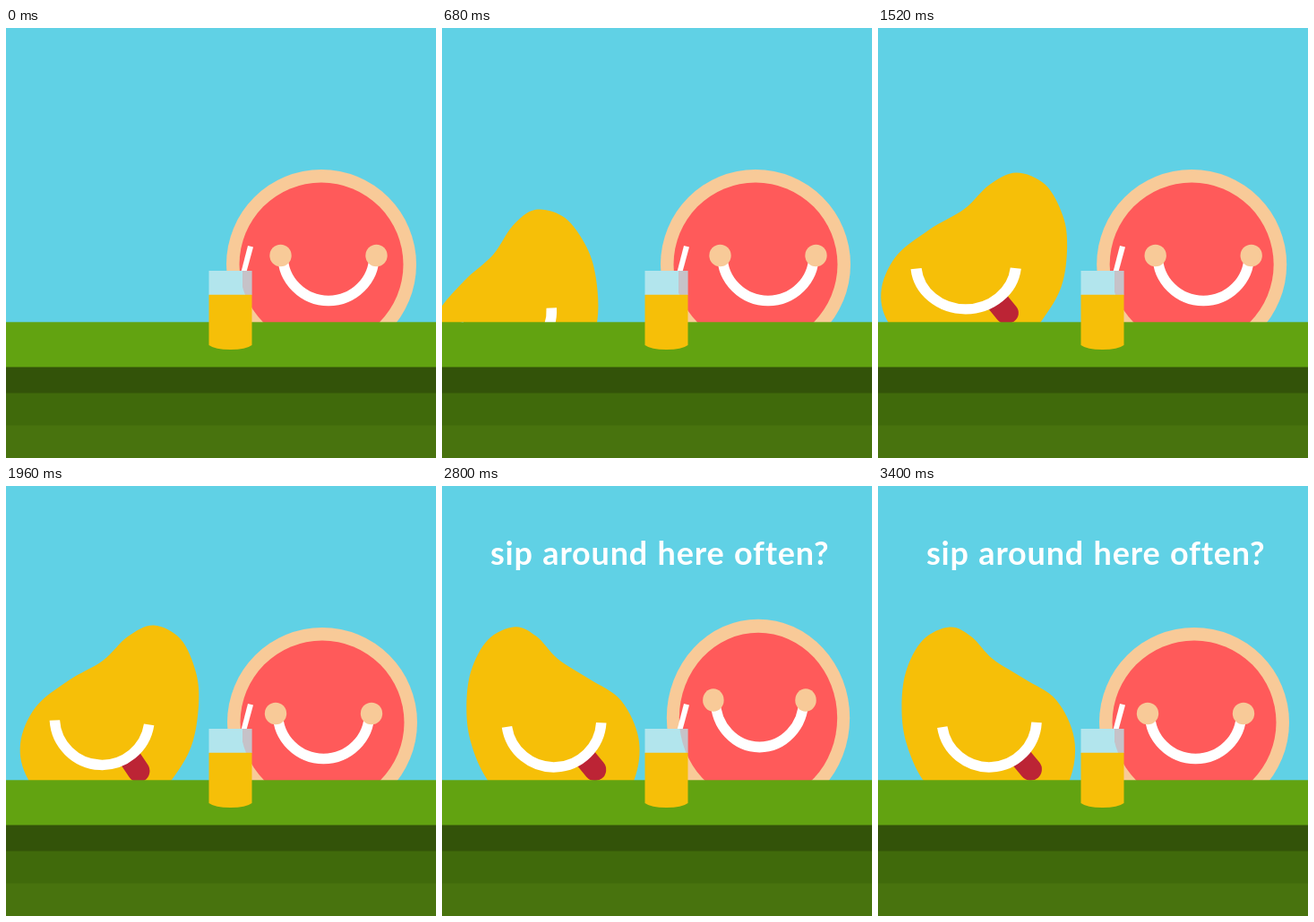
An HTML page that plays this animation: 480 by 480 pixels, repeating every 4160 ms.

```html
<!DOCTYPE html>
<html lang="en">
<head>
<meta charset="utf-8">
<title>Juice bar</title>
<style>
  html, body { margin: 0; width: 100%; height: 100%; overflow: hidden; background: #60d1e5; }
  svg { display: block; width: 100vw; height: 100vh; }
  text { font: 700 36px Lato, "Open Sans", sans-serif; letter-spacing: .8px; word-spacing: 1px; }
</style>
</head>
<body>
<svg viewBox="0 0 480 480">
  <defs>
    <clipPath id="glassSide"><rect x="264" y="271" width="10.5" height="27"/></clipPath>
  </defs>
  <rect width="480" height="480" fill="#60d1e5"/>

  <g id="mango">
    <path id="skin" fill="#f6bf08"/>
    <g id="grin">
      <path transform="translate(0 -6) rotate(53.2)" fill="#bc2435"
            d="M52-12.5H72.5a12.5 12.5 0 0 1 0 25H52z"/>
      <path d="M-52.7 0A53 53 0 0 0 52.7 0" fill="none" stroke="#fff" stroke-width="11.5"/>
    </g>
  </g>

  <g id="grapefruit">
    <circle r="106" fill="#f8ca98"/>
    <circle r="91.5" fill="#ff5a5a"/>
    <g id="face">
      <path d="M-51 0A51 50.5 0 0 0 51 0" fill="none" stroke="#fff" stroke-width="11.5"/>
      <circle cx="-53.5" r="12.2" fill="#f8ca98"/>
      <circle cx="53.5" r="12.2" fill="#f8ca98"/>
    </g>
  </g>

  <rect y="328.3" width="480" height="51" fill="#62a311"/>
  <rect y="378.5" width="480" height="30" fill="#335309"/>
  <rect y="407.5" width="480" height="37" fill="#406a0b"/>
  <rect y="443.5" width="480" height="37" fill="#48730e"/>

  <path d="M270 243L276 244.5L268.5 272H262.5z" fill="#fff"/>
  <rect x="226.5" y="271" width="48" height="27" fill="#b2e5ed"/>
  <g clip-path="url(#glassSide)">
    <circle id="tint" r="91.5" fill="#ff5a5a" opacity=".25"/>
  </g>
  <path d="M226.5 297.7H274.5V354Q268 359 250.5 359T226.5 354z" fill="#f6bf08"/>

  <g id="line"><text x="243.2" y="88" text-anchor="middle" fill="#fff">sip around here often?</text></g>
</svg>

<script>
const LOOP = 4160, STEP = 40, BASE = 360;
const el = id => document.getElementById(id);
const [mango, skin, grin, grapefruit, face, tint, line] =
  ["mango", "skin", "grin", "grapefruit", "face", "tint", "line"].map(el);

const mix = (a, b, k) => a + (b - a) * k;
const ease = {
  linear: p => p,
  in: p => p * p,
  out: p => 1 - (1 - p) ** 2,
  strong: p => 1 - (1 - p) ** 4,
  both: p => p < .5 ? 2 * p * p : 1 - 2 * (1 - p) ** 2
};

// Each key: time, easing into it, values
function pose(keys, t) {
  let i = keys.findIndex(k => k[0] > t);
  if (i < 0) return keys[keys.length - 1].slice(2);
  if (i === 0) return keys[0].slice(2);
  const a = keys[i - 1], b = keys[i];
  const k = ease[b[1]]((t - a[0]) / (b[0] - a[0]));
  return b.slice(2).map((v, n) => mix(a[n + 2], v, k));
}

// dx, dy, tilt, scale x, scale y
const mangoKeys = [
  [400, "both", -188, 134, -27, 1, 1],
  [1040, "strong", 2, 44, -10.3, 1, 1],
  [1120, "both", 2, 44, -10.3, 1, 1],
  [1240, "both", 2, 60, -12, 1.04, .95],
  [1360, "out", 2, -34, -8, .96, 1.08],
  [1480, "in", -2, 4, -4, 1.03, .99],
  [1520, "out", -4, 0, -2.7, 1.055, .96],
  [1600, "both", -3, 0, -1, 1.05, .96],
  [1840, "both", 0, 0, 0, 1, 1],
  [1980, "both", 0, 0, 0, 1, 1],
  [2080, "both", 0, 6, 0, 1.05, .94],
  [2220, "out", 2, -80, -2, .96, 1.1],
  [2360, "in", 1, 0, -5, 1, 1],
  [2440, "out", 1, 0, -6, 1, .98],
  [2500, "out", 1, 0, -8, 1, .98],
  [2760, "both", 0, 0, .5, 1, 1],
  [2920, "both", 0, 0, 0, 1, 1]
];
const turnKeys = [[2080, "linear", 0], [2360, "linear", 1]];

// centre x, centre y, face x, face y, scale x, scale y
const grapeKeys = [
  [0, "both", 352, 264, 8, -10, 1, 1],
  [560, "out", 350, 264, 14, -10, 1, 1],
  [1480, "both", 350, 264, 13.7, -10, 1, 1],
  [1720, "both", 353, 264, 1.5, -10, 1, 1],
  [2640, "both", 353, 264, 1.5, -10, 1, 1],
  [2820, "both", 353, 258.7, 1.5, -19.3, .963, 1.04],
  [3000, "both", 353, 266, 1.5, -7, 1.038, .963],
  [3180, "both", 353, 263.5, 1.5, -11, .99, 1.01],
  [3400, "both", 353, 264, 1.5, -10, 1, 1]
];
const lineKeys = [
  [2280, "both", 0], [2440, "out", .94], [2520, "out", 1.06], [2700, "both", 1]
];

// Mango outline leaning right, then leaning left
const leanRight = [[25, 328], [16, 288], [33, 247], [70, 217], [108, 195], [136, 168], [165, 155.5],
  [195, 171], [212, 208], [215, 245], [207, 290], [185, 328], [150, 368], [62, 372]];
const leanLeft = [[50, 328], [32, 288], [26.5, 250], [31, 208], [50, 172], [80, 157.5], [104, 168],
  [128, 193], [163, 215], [199, 239], [219, 282], [214, 328], [185, 372], [85, 368]];

// Smooth closed curve through the points
function blob(pts) {
  const n = pts.length, at = i => pts[(i + n) % n];
  let d = "M" + pts[0];
  for (let i = 0; i < n; i++) {
    const [p, a, b, q] = [at(i - 1), at(i), at(i + 1), at(i + 2)];
    const c1 = a.map((v, k) => v + (b[k] - p[k]) / 6);
    const c2 = b.map((v, k) => v - (q[k] - a[k]) / 6);
    d += `C${c1} ${c2} ${b}`;
  }
  return d + "z";
}

const place = (node, value) => node.setAttribute("transform", value);

function draw(t) {
  const [dx, dy, tilt, mx, my] = pose(mangoKeys, t);
  const [turn] = pose(turnKeys, t);
  const pivot = mix(116, 122, turn);
  mango.style.display = t < 400 ? "none" : "";
  place(mango, `translate(${pivot + dx} ${BASE + dy}) rotate(${tilt}) scale(${mx} ${my}) translate(${-pivot} ${-BASE})`);
  skin.setAttribute("d", blob(leanRight.map((p, i) => p.map((v, k) => mix(v, leanLeft[i][k], turn)))));
  place(grin, `translate(${mix(107, 124.4, turn)} ${mix(264, 266.5, turn)}) rotate(${mix(2.7, -2.9, turn)})`);

  const [cx, cy, fx, fy, gx, gy] = pose(grapeKeys, t);
  const body = `translate(${cx} ${cy}) scale(${gx} ${gy})`;
  place(grapefruit, body);
  place(tint, body);
  place(face, `translate(${fx} ${fy})`);

  const [size] = pose(lineKeys, t);
  line.style.display = size > 0 ? "" : "none";
  place(line, `translate(242.5 77) scale(${size}) translate(-242.5 -77)`);
}

const start = performance.now();
function tick() {
  const t = (performance.now() - start) % LOOP;
  draw(Math.floor(t / STEP) * STEP);
  requestAnimationFrame(tick);
}
tick();
</script>
</body>
</html>
```
